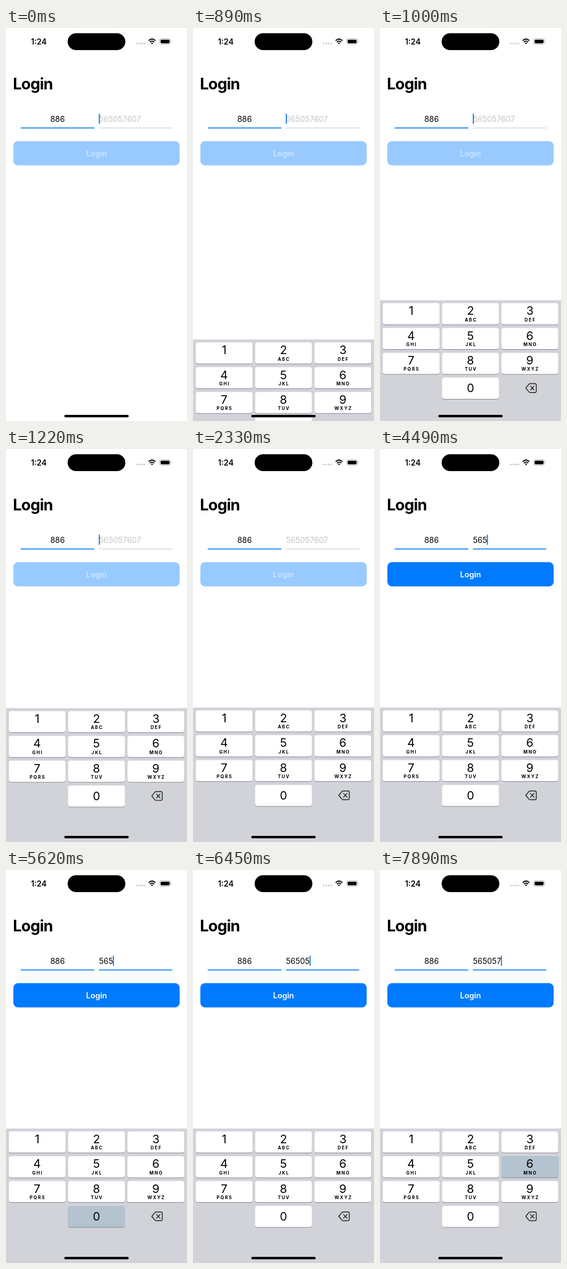
Recreate the animation shown at these times as an HTML page. Size 295 by 640 pixels, loop 8 s.

```html
<!DOCTYPE html>
<html lang="en">
<head>
<meta charset="utf-8">
<title>Login form</title>
<style>
  html, body { margin: 0; width: 100%; height: 100%; overflow: hidden; background: #fff; }
  svg { display: block; width: 295px; height: 640px; font-family: Inter, Roboto, sans-serif; }
  .body { font-size: 12.75px; }
  .semi { font-weight: 600; }
  .title { font-size: 25.5px; font-weight: 700; letter-spacing: -.8px; }
  .digit { font-size: 19px; text-anchor: middle; }
  .letters { font-size: 7.3px; font-weight: 700; letter-spacing: 1.5px; text-anchor: middle; }
  .mid { text-anchor: middle; }
</style>
</head>
<body>
<svg viewBox="0 0 295 640">
  <rect width="295" height="640" fill="#fff"/>

  <text class="body semi" x="53.5" y="26.7" text-anchor="middle">1:24</text>
  <rect x="100.5" y="8.5" width="94" height="27.5" rx="13.75"/>
  <g fill="#c4c4c6">
    <circle cx="213" cy="25.2" r="1.3"/><circle cx="217.2" cy="25.2" r="1.3"/>
    <circle cx="221.2" cy="25.2" r="1.3"/><circle cx="225.2" cy="25.2" r="1.3"/>
  </g>
  <g fill="none" stroke="#000" stroke-width="1.8">
    <path d="M232.5 20.6 Q238 15.4 243.5 20.6M234.6 23 Q238 19.8 241.4 23"/>
    <path d="M236.3 24.6 Q238 23.1 239.7 24.6L238 26.4Z" fill="#000" stroke="none"/>
  </g>
  <rect x="250.4" y="17.4" width="17.8" height="9" rx="3" fill="none" stroke="#a5a5a7" stroke-width=".9"/>
  <rect x="251.9" y="18.9" width="14.8" height="6" rx="1.8"/>
  <path d="M269.2 20.4q1.4 1.5 0 3z" fill="#a5a5a7"/>

  <text class="title" x="11.2" y="100.3">Login</text>

  <text class="body mid" x="84" y="152.8">886</text>
  <rect x="24" y="162" width="120" height="1.5" fill="#007aff"/>
  <text id="phone" class="body" x="151.5" y="152.8"></text>
  <rect id="underline" x="151.5" y="162" width="119.5" height="1.5"/>
  <rect id="caret" y="139.5" width="1.6" height="16.5" fill="#0a74e6"/>

  <rect id="button" x="12" y="184.3" width="271" height="39.4" rx="7.5"/>
  <text id="label" class="body semi mid" x="147.5" y="208.7" fill="#fff">Login</text>

  <g id="keyboard"><rect width="295" height="219" fill="#d1d3d9"/></g>
  <rect x="95" y="630" width="105" height="4" rx="2"/>
</svg>

<script>
const LOOP = 8000;
const NUMBER = '565057607';
const PRESSES = [2440, 3110, 4240, 5620, 6200, 7020, 7890];
const RELEASES = [2780, 3360, 4490, 5870, 6450, 7270, LOOP];
const SLIDE_TICKS = [770, 890, 1000, 1110, 1220, 1340];
// Times at which the caret starts to fade, is hidden, starts to return, and is solid.
const BLINKS = [
  [140, 260, 500, 620], [1340, 1340, 1550, 1670], [2210, 2330, 2440, 2440],
  [3640, 3760, 4000, 4120], [4890, 4890, 5130, 5250],
  [6730, 6840, 7020, 7020], [7670, 7780, 7890, 7890]
];
const LETTERS = { 2: 'ABC', 3: 'DEF', 4: 'GHI', 5: 'JKL', 6: 'MNO', 7: 'PQRS', 8: 'TUV', 9: 'WXYZ' };

const $ = id => document.getElementById(id);
const phone = $('phone'), caret = $('caret'), keyboard = $('keyboard');
const keys = {};

function add(tag, attrs, text = '') {
  const node = document.createElementNS('http://www.w3.org/2000/svg', tag);
  for (const name in attrs) node.setAttribute(name, attrs[name]);
  node.textContent = text;
  return keyboard.appendChild(node);
}

function addKey(digit, col, row) {
  const x = 4.4 + col * 96.75, y = 4.7 + row * 40.4;
  const box = { x, y, width: 92.7, height: 34.6, rx: 3.8 };
  const centre = x + 46.35;
  add('rect', { ...box, y: y + 1, fill: '#8d8f94' });
  keys[digit] = add('rect', box);
  add('text', { class: 'digit', x: centre, y: y + (digit ? 19.3 : 24) }, digit);
  add('text', { class: 'letters', x: centre + .75, y: y + 29.6 }, LETTERS[digit]);
}

for (let digit = 1; digit <= 9; digit++) addKey(digit, (digit - 1) % 3, Math.floor((digit - 1) / 3));
addKey(0, 1, 3);
add('path', {
  d: 'M237.6 143 l5.2 -6.3 q.8 -.9 2 -.9 h7.7 q2.2 0 2.2 2.2 v10 q0 2.2 -2.2 2.2 h-7.7 q-1.2 0 -2 -.9 z'
    + 'M245.2 139.8 l6 6.4 m0 -6.4 l-6 6.4',
  fill: 'none', stroke: '#111', 'stroke-width': 1.2, 'stroke-linecap': 'round', 'stroke-linejoin': 'round'
});

function keyboardTop(t) {
  const tick = SLIDE_TICKS.filter(time => time <= t).pop();
  if (!tick) return 640;
  if (t >= 1340) return 421;
  const phase = (tick - 766) * .0165;
  return 421 + 219 * (1 + phase) * Math.exp(-phase);
}

function caretOpacity(t) {
  for (const [fade, hidden, back, solid] of BLINKS) {
    if (t >= fade && t < solid) return t >= hidden && t < back ? 0 : .5;
  }
  return 1;
}

function draw(t) {
  const count = RELEASES.filter(time => time <= t).length;
  const pressed = PRESSES[count] <= t ? NUMBER[count] : null;

  phone.textContent = count ? NUMBER.slice(0, count) : NUMBER;
  phone.setAttribute('fill', count ? '#000' : '#c5c5c7');
  caret.setAttribute('x', 151.3 + (count ? phone.getComputedTextLength() : 0));
  caret.setAttribute('opacity', caretOpacity(t));
  $('underline').setAttribute('fill', count ? '#007aff' : '#dcdcde');
  $('button').setAttribute('fill', count ? '#007aff' : '#99caff');
  $('label').setAttribute('opacity', count ? 1 : .5);

  for (const digit in keys) keys[digit].setAttribute('fill', digit === pressed ? '#b3c3d0' : '#fff');
  keyboard.setAttribute('transform', `translate(0 ${keyboardTop(t)})`);
}

const start = performance.now();
function frame() {
  draw((performance.now() - start) % LOOP);
  requestAnimationFrame(frame);
}
frame();
</script>
</body>
</html>
```
